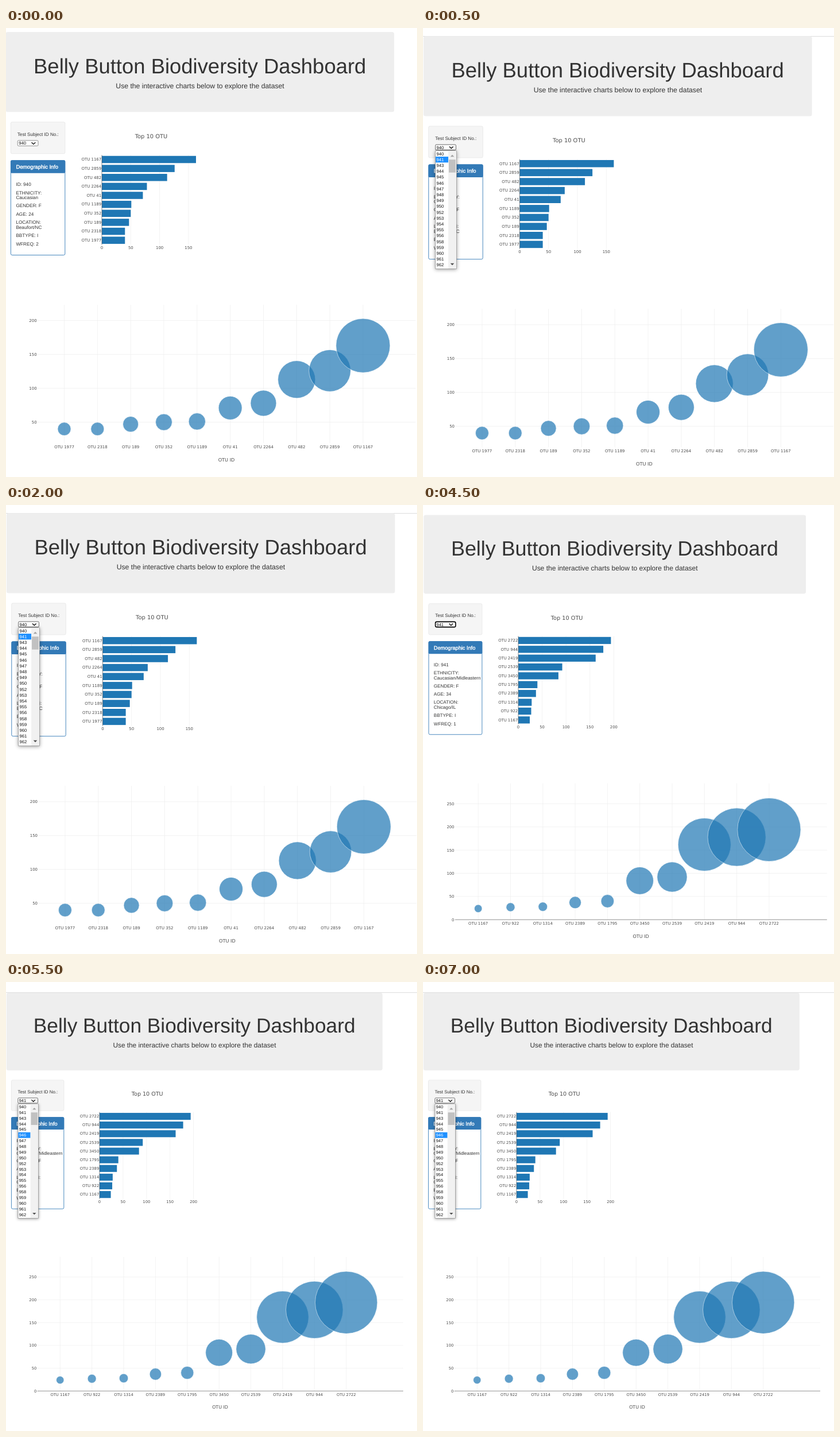
Animation of 716x782 px, one loop 8 s. Source, as an HTML page:

```html
<!DOCTYPE html>
<html lang="en">
<head>
<meta charset="utf-8">
<title>Biodiversity Dashboard</title>
<style>
  html, body { margin: 0; width: 100%; height: 100%; overflow: hidden; background: #fff; }
  #stage { width: 716px; height: 782px; overflow: hidden; }
  #film { animation: cut 8s step-end infinite; }
  #film svg { display: block; width: 716px; height: 782px; overflow: hidden; }
  @keyframes cut {
    0% { transform: translateY(0); }
    6.25% { transform: translateY(-782px); }
    37.5% { transform: translateY(-1564px); }
    68.75%, 100% { transform: translateY(-2346px); }
  }
  text { font: 8.16px "Liberation Sans", Arial, sans-serif; fill: #333; text-rendering: geometricPrecision; }
  .h1 { font-size: 36.45px; }
  .lead { font-size: 12.2px; }
  .head { font-size: 9.33px; fill: #fff; stroke: #fff; stroke-width: .4px; }
  .opt { font-size: 7.6px; fill: #111; }
  .opt.on { fill: #fff; }
  .tick, .axis, .name { font-family: "DejaVu Sans", Verdana, sans-serif; fill: #4c4c4c; }
  .tick { font-size: 6.95px; }
  .axis { font-size: 8.16px; }
  .name { font-size: 9.9px; }
  .grid { stroke: #eee; stroke-width: .7; }
  .zero { stroke: #444; stroke-width: .6; }
  .bar { fill: #1f77b4; }
  .dot { fill: #1f77b4; stroke: #fff; stroke-width: .7; opacity: .7; }
  .list { fill: #fff; stroke: #8a8a8a; stroke-width: .7; filter: drop-shadow(0 1.5px 3px #0006); }
</style>
</head>
<body>
<div id="stage"><div id="film"></div></div>
<script>
const subjects = [
  {
    id: 940, ethnicity: 'Caucasian', age: 24, place: 'Beaufort/NC', wash: 2,
    otu: [1167, 2859, 482, 2264, 41, 1189, 352, 189, 2318, 1977],
    count: [163, 126, 113, 78, 71, 51, 50, 47, 40, 40],
    barTicks: [0, 50, 100, 150],
    bubble: { x: 101.5, step: 57.83, base: 745.5, unit: 1.18, ticks: [50, 100, 150, 200] }
  },
  {
    id: 941, ethnicity: 'Caucasian/Midleastern', age: 34, place: 'Chicago/IL', wash: 1,
    otu: [2722, 944, 2419, 2539, 3450, 1795, 2389, 1314, 922, 1167],
    count: [194, 178, 162, 92, 84, 40, 37, 28, 27, 24],
    barTicks: [0, 50, 100, 150, 200],
    bubble: { x: 96, step: 57.22, base: 723.2, unit: .8208, ticks: [0, 50, 100, 150, 200, 250] }
  }
];

// Page offset and zoom; "pick" is the highlighted option of an open menu.
const views = [
  { who: 0, x: 0, y: 0, zoom: 1, edge: '#767676' },
  { who: 0, x: 1.4, y: 7.2, zoom: 1, edge: '#444', pick: 941, rule: 14 },
  { who: 1, x: 1.7, y: 10.6, zoom: .984, edge: '#000', focus: true },
  { who: 1, x: 1.3, y: 12.3, zoom: .968, edge: '#444', pick: 946, rule: 18 }
];

const skipped = [942, 951, 957];
const options = Array.from({ length: 23 }, (_, i) => 940 + i).filter(n => !skipped.includes(n));

const text = (x, y, s, cls = '', anchor = 'start') =>
  `<text x="${x}" y="${y}" class="${cls}" text-anchor="${anchor}">${s}</text>`;
const rect = (x, y, w, h, attrs = '') =>
  `<rect x="${x}" y="${y}" width="${w}" height="${h}" ${attrs}/>`;
const line = (x1, y1, x2, y2, cls) =>
  `<line x1="${x1}" y1="${y1}" x2="${x2}" y2="${y2}" class="${cls}"/>`;

function header() {
  return rect(-.5, 7, 676.7, 139.3, 'rx="3.5" fill="#eee"') +
    text(337.7, 78.5, 'Belly Button Biodiversity Dashboard', 'h1', 'middle') +
    text(338, 105.1, 'Use the interactive charts below to explore the dataset', 'lead', 'middle');
}

function picker(s, v) {
  return rect(8.3, 163.8, 94.6, 55, 'rx="2.4" fill="#f5f5f5" stroke="#e3e3e3" stroke-width=".7"') +
    text(19.8, 187.5, 'Test Subject ID No.:') +
    rect(20.2, 195.9, 35.8, 9.4, `rx="${v.focus ? 2.4 : 1.6}" fill="#fff" stroke="${v.edge}" stroke-width="${v.focus ? 1.6 : .8}"`) +
    text(22.2, 203.4, s.id, 'opt') +
    '<path d="M44.5 199.2l3.4 3.2 3.4-3.2" fill="none" stroke="#111" stroke-width="1.4"/>';
}

function panel(s) {
  const rows = [
    [275, 'ID: ' + s.id], [289.5, 'ETHNICITY:'], [298, s.ethnicity],
    [312, 'GENDER: F'], [326.5, 'AGE: ' + s.age], [341.3, 'LOCATION:'],
    [350, s.place], [364, 'BBTYPE: I'], [379, 'WFREQ: ' + s.wash]
  ];
  return rect(8.4, 230.7, 94.4, 164.8, 'rx="2.4" fill="#fff" stroke="#337ab7" stroke-width=".9"') +
    rect(8, 230.3, 95.2, 22.4, 'rx="2" fill="#337ab7"') +
    text(17.4, 245.2, 'Demographic Info', 'head') +
    rows.map(([y, t]) => text(17.4, y, t)).join('');
}

function bars(s) {
  const left = 167, top = 221.2, step = 15.63, unit = 164 / s.count[0];
  const bottom = top + step * 10;
  let out = text(253, 192, 'Top 10 OTU', 'name', 'middle');
  for (const t of s.barTicks) {
    const x = left + t * unit;
    if (t) out += line(x, top, x, bottom, 'grid');
    out += text(x, 385, t, 'tick', 'middle');
  }
  s.count.forEach((n, i) => {
    const mid = top + step * (i + .5);
    out += rect(left, mid - step * .4, n * unit, step * .8, 'class="bar"') +
      text(166.2, mid + 2.3, 'OTU ' + s.otu[i], 'tick', 'end');
  });
  return out + line(left, top, left, bottom, 'zero');
}

function bubbles(s) {
  const b = s.bubble, last = s.count.length - 1;
  const px = i => b.x + b.step * (last - i);
  const py = n => b.base - b.unit * n;
  let out = '', dots = '';
  s.count.forEach((n, i) => {
    out += line(px(i), 482, px(i), 723, 'grid') +
      text(px(i), 732.2, 'OTU ' + s.otu[i], 'tick', 'middle');
    dots = `<circle class="dot" cx="${px(i)}" cy="${py(n)}" r="${n * .289}"/>` + dots;
  });
  for (const t of b.ticks) {
    out += line(55, py(t), 713.5, py(t), t ? 'grid' : 'zero') +
      text(53.6, py(t) + 2.5, t, 'tick', 'end');
  }
  return out + dots + text(384, 755, 'OTU ID', 'axis', 'middle');
}

function menu(pick) {
  let out = rect(20.3, 206.6, 36.6, 205.6, 'class="list"');
  options.forEach((n, i) => {
    const mid = 211.8 + i * 10.2, on = n === pick;
    if (on) out += rect(20.7, mid - 5.1, 22, 10.2, 'fill="#1e90ff"');
    out += text(22.2, mid + 2.7, n, on ? 'opt on' : 'opt');
  });
  return out + rect(42.7, 207, 13.8, 204.8, 'fill="#f1f1f1"') +
    rect(43.6, 222, 11.8, 22.5, 'fill="#c1c1c1"') +
    '<path d="M46.3 217l3.3-3.4 3.3 3.4z" fill="#a3a3a3"/>' +
    '<path d="M46.3 402.6l3.3 3.4 3.3-3.4z" fill="#505050"/>';
}

function scene(v) {
  const s = subjects[v.who];
  return `<svg viewBox="0 0 716 782">` +
    (v.rule ? rect(0, v.rule, 716, 1, 'fill="#ddd"') : '') +
    `<g transform="translate(${v.x} ${v.y}) scale(${v.zoom})">` +
    header() + picker(s, v) + panel(s) + bars(s) + bubbles(s) +
    (v.pick ? menu(v.pick) : '') + '</g></svg>';
}

document.getElementById('film').innerHTML = views.map(scene).join('');
</script>
</body>
</html>
```
